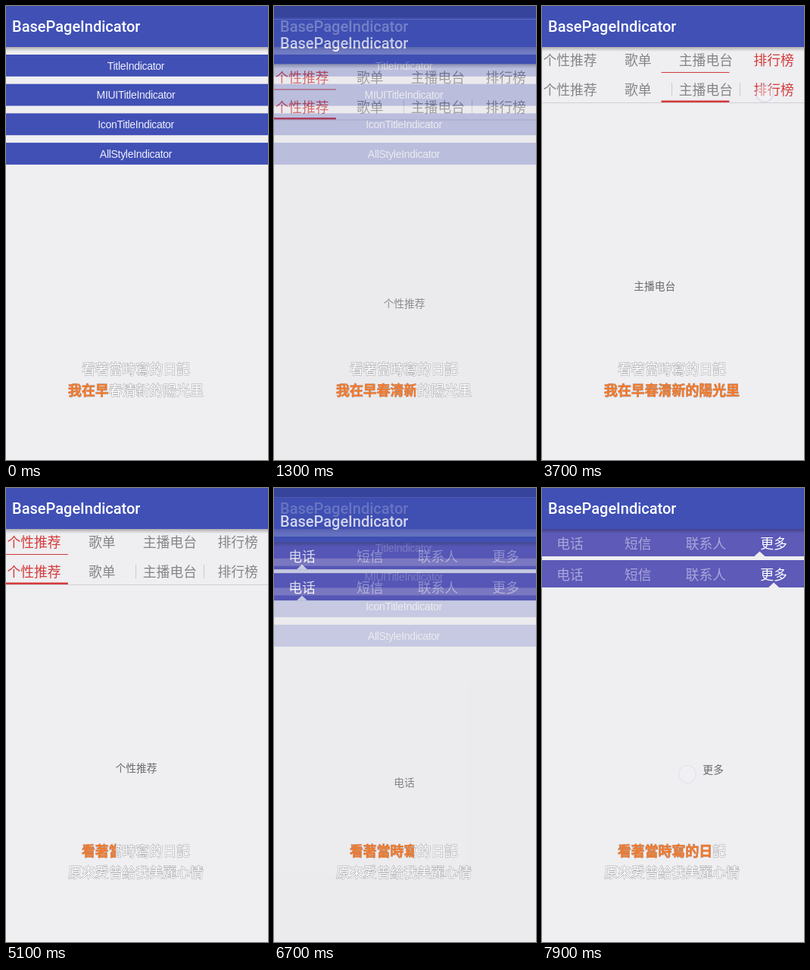
An HTML page that plays this animation: 346x598 px, repeating every 8000 ms.

```html
<!DOCTYPE html>
<html lang="zh">
<head>
<meta charset="utf-8">
<style>
html, body { margin: 0; width: 100%; height: 100%; overflow: hidden; background: #efeef1; }
svg { display: block; width: 100%; height: 100%; }
text { font-family: "Noto Sans CJK SC", "Noto Sans CJK", sans-serif; text-anchor: middle; }
.title { font: 500 20px Roboto, sans-serif; fill: #fff; text-anchor: start; }
.button { font: 14px "Liberation Sans", sans-serif; letter-spacing: -.3px; fill: #eeeefa; }
.tab { font-size: 17.8px; }
.label { font-size: 13.8px; fill: #6a6a6c; }
.lyric { font-size: 17.9px; font-weight: 500; fill: #fff; stroke: #a4a4a8; stroke-width: 1px; paint-order: stroke; }
.sung { font-weight: 700; fill: #f07a2e; stroke: #c07a50; stroke-width: .5px; }
</style>
</head>
<body>
<svg id="stage" viewBox="0 0 346 598" preserveAspectRatio="none"></svg>
<script>
const LOOP = 8000, TICK = 100, GLIDE = 400, LAG = 20, STEP = 89.7;
const BLUE = '#4050b5', PURPLE = '#5d5ab8', BG = '#efeef1', RED = '#d33b3b', GRAY = '#c9c9cd';
const stage = document.getElementById('stage');
const musicTabs = ['个性推荐', '歌单', '主播电台', '排行榜'];
const phoneTabs = ['电话', '短信', '联系人', '更多'];
const buttons = ['TitleIndicator', 'MIUITitleIndicator', 'IconTitleIndicator', 'AllStyleIndicator'];

// Page moves: [start, tabs to travel]
const musicMoves = [[1950, 1], [2192, 1], [2680, 1], [3100, -3], [3571, 3], [4300, -3]];
const phoneMoves = [[7200, 1], [7560, 1], [7714, 1]];
// Taps: [time, x, y]
const taps = [[600, 272, 80], [2500, 294, 323], [3550, 294, 115], [4800, 37, 80], [6100, 256, 118], [7660, 192, 377]];
// The screen stands still: [start, duration]
const rests = [[0, 500], [1300, 300], [1700, 400], [2200, 300], [3300, 400], [5100, 500], [6800, 600]];

const ramp = (t, start, length) => Math.min(1, Math.max(0, (t - start) / length));
const easeOut = u => 1 - (1 - u) ** 3;
const pageAt = (moves, t) => moves.reduce((p, [start, n]) => p + n * easeOut(ramp(t, start, GLIDE)), 0);
const chosenAt = (moves, t) => moves.reduce((p, [start, n]) => p + (t >= start ? n : 0), 0);

function refresh(now) {
  const t = Math.floor(now / TICK) * TICK;
  const rest = rests.find(([start, length]) => t >= start && t < start + length);
  return rest ? rest[0] : t;
}

const rect = (x, y, w, h, fill) => `<rect x="${x}" y="${y}" width="${w}" height="${h}" fill="${fill}"/>`;
const text = (x, y, s, cls, more = '') => `<text x="${x}" y="${y}" class="${cls}" ${more}>${s}</text>`;
const center = i => 37 + STEP * i;

const shade = rect(0, 54, 346, 6, 'url(#shade)');
const header = (top = 0) => rect(0, top, 346, 54 - top, BLUE) + shade + text(8, 33.5, 'BasePageIndicator', 'title');

const tabs = (names, y, chosen, on, off) =>
  names.map((s, i) => text(center(i), y, s, 'tab', `fill="${i === chosen ? on : off}"`)).join('');

const labels = (names, page, y) =>
  names.map((s, i) => text(172 + (i - page) * 346, y, s, 'label')).join('');

const home = () => rect(0, 0, 346, 598, BG) + header() + buttons.map((s, i) =>
  rect(0, 64 + i * 38.7, 346, 28.8, BLUE) + text(171.5, 83.7 + i * 38.7, s, 'button')).join('');

function music(t) {
  const left = center(pageAt(musicMoves, t - LAG)) - STEP / 2;
  const row = y => tabs(musicTabs, y, chosenAt(musicMoves, t), RED, '#858587');
  return row(78) + row(117) + rect(0, 127, 346, 1, '#d0d0d3') +
    rect(171, 101, 1, 18, GRAY) + rect(261, 101, 1, 18, GRAY) +
    rect(left, 87, STEP, 1, RED) + rect(left, 124.5, STEP, 2.5, RED) +
    labels(musicTabs, pageAt(musicMoves, t), 374);
}

function phone(t) {
  const chosen = chosenAt(phoneMoves, t);
  const row = (y, p) => rect(0, y, 346, 36, PURPLE) + tabs(phoneTabs, y + 25.5, chosen, '#fff', '#a9a6da') +
    `<path d="M${center(p) - 7} ${y + 36}l7 -6.5l7 6.5z" fill="${BG}"/>`;
  return row(54, pageAt(phoneMoves, t - LAG)) + row(95, chosen) + shade +
    labels(phoneTabs, pageAt(phoneMoves, t), 376);
}

// A page that rises into place while it fades in over the home page.
function sheet(alpha, body) {
  if (alpha <= 0) return '';
  const top = alpha < 1 ? -5 : 0;
  const dim = rect(0, 0, 346, 598, 'rgba(0,0,0,.05)') + rect(0, 0, 346, 15, 'rgba(0,0,0,.1)');
  return dim + `<g opacity="${alpha}" transform="translate(0 ${75 * (1 - alpha)})">` +
    rect(0, top, 346, 603, BG) + header(top) + body + '</g>';
}

function lyric(y, s, sung, id) {
  return `<clipPath id="${id}">${rect(0, y - 20, sung, 30, '#000')}</clipPath>` +
    text(171.5, y, s, 'lyric') + text(171.5, y, s, 'lyric sung', `clip-path="url(#${id})"`);
}

const touches = t => taps.filter(([start]) => t >= start).map(([start, x, y]) =>
  `<circle cx="${x}" cy="${y}" r="11.3" fill="#f8f8fc" fill-opacity=".85" stroke="#c6c5e6"
    stroke-width="1.5" opacity="${1 - ramp(t, start, 300)}"/>`).join('');

function draw(t) {
  const first = t < 4200;
  const high = 100 + 45 * ramp(t, 4000, 1100) + 80 * ramp(t, 5500, 2400);
  const low = first ? Math.min(262, 135 + t * .04) : 0;
  stage.innerHTML = `<defs><linearGradient id="shade" x2="0" y2="1">
    <stop stop-opacity=".28"/><stop offset="1" stop-opacity="0"/></linearGradient></defs>` +
    home() +
    sheet(ramp(t, 1055, 350) - ramp(t, 5500, 200), music(t)) +
    sheet(ramp(t, 6430, 350), phone(t)) +
    touches(t) +
    lyric(484.5, '看著當時寫的日記', high, 'high') +
    lyric(513.3, first ? '我在早春清新的陽光里' : '原來愛曾給我美麗心情', low, 'low');
}

let shown = -1;
function loop(now) {
  const t = refresh(now % LOOP);
  if (t !== shown) draw(shown = t);
  requestAnimationFrame(loop);
}
draw(0);
requestAnimationFrame(loop);
</script>
</body>
</html>
```
